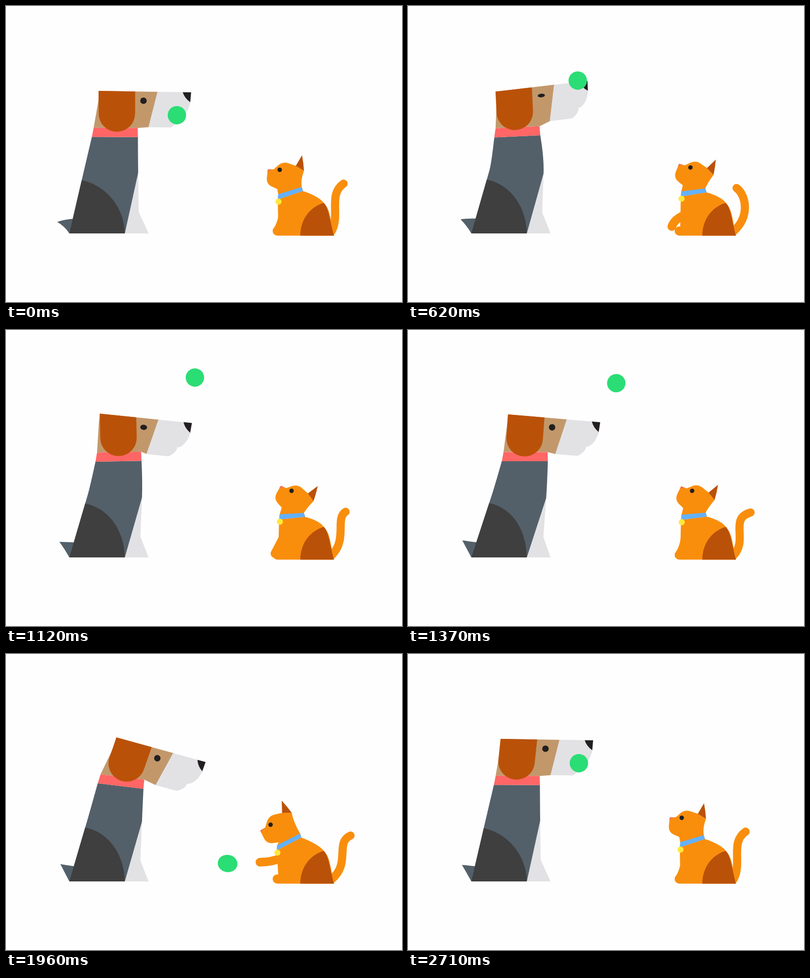
An HTML page with a canvas that plays this animation: 800x600 px, repeating every 2.75 s.

```html
<!DOCTYPE html>
<html lang="en">
<head>
<meta charset="utf-8">
<title>Dog and cat playing ball</title>
<style>
  html, body { margin: 0; width: 100%; height: 100%; overflow: hidden; background: #fefefe; }
  canvas { display: block; width: 100vw; height: 100vh; }
</style>
</head>
<body>
<canvas id="stage" width="800" height="600"></canvas>
<script>
const ctx = document.getElementById('stage').getContext('2d');
const LOOP = 2750, STEPS = 66, GRAVITY = 2.403;
const C = {
  bg: '#fefefe', slate: '#53606a', dark: '#3f3f3f', pale: '#e2e2e5', tan: '#c2986b',
  brown: '#ba5108', red: '#ff6666', ink: '#231f20', green: '#2bdd75',
  orange: '#f98e0d', blue: '#64b1fb', yellow: '#ffe83c', pink: '#f0705f'
};

// Smooth looping motion through key poses; each pose is [step, ...values].
function track(poses) {
  const n = poses.length;
  const pose = i => poses[(i + n) % n];
  const time = i => pose(i)[0] + Math.floor(i / n) * STEPS;
  const slope = (i, c) => (pose(i + 1)[c] - pose(i)[c]) / (time(i + 1) - time(i));
  const tangent = (i, c) => {
    const a = slope(i - 1, c), b = slope(i, c);
    return a * b <= 0 ? 0 : 2 * a * b / (a + b);
  };
  return k => {
    let i = n - 1;
    while (poses[i][0] > k) i--;
    const d = time(i + 1) - time(i), u = (k - time(i)) / d, v = 1 - u;
    return pose(i).slice(1).map((a, j) => {
      const c = j + 1;
      return v * v * (1 + 2 * u) * a + u * u * (3 - 2 * u) * pose(i + 1)[c]
        + d * u * v * (v * tangent(i, c) - u * tangent(i + 1, c));
    });
  };
}

// Body lean, neck x, head corner x and y, head tilt, ear swing.
const dogPose = track([
  [0, 0, 220, 187, 172, 0.9, 0],
  [9, 8, 224, 178, 179, -9, -2],
  [11, 8, 223, 176, 178, -14, -2],
  [21, 3, 218.5, 180, 168, 6.8, -4],
  [33, 11, 236, 202, 171, 4.9, 4],
  [47, 7, 231.5, 223, 169, 15.5, 19],
  [58, 0, 224, 220, 169, 16.5, 4],
  [65, 0, 220, 187, 172, 0.9, 6]
]);
// Eye x and y, head tilt, tail handles x, tail tip x and y.
const catPose = track([
  [0, 553, 332, 0, 676, 650, 682, 360],
  [9, 560, 329.5, 5, 692, 682, 655, 371],
  [21, 578, 326, 24, 693, 681, 677, 367],
  [33, 574, 326, 20, 688, 648, 692, 370],
  [47, 534.5, 346, -32, 697, 664, 696, 368],
  [58, 542.5, 338, -9, 676, 645, 678.5, 358],
  [65, 553, 332, 0, 676, 650, 682, 360]
]);

const rad = deg => deg * Math.PI / 180;
const mix = (a, b, u) => a.map((v, i) => v + (b[i] - v) * u);
const add = (p, x, y) => [p[0] + x, p[1] + y];
const peak = (k, mid, half) => Math.max(0, 1 - Math.abs(k - mid) / half);
const ease = (k, from, to) => {
  const u = Math.min(1, Math.max(0, (k - from) / (to - from)));
  return u * u * (3 - 2 * u);
};
const place = (ox, oy, deg) => (x, y) => {
  const c = Math.cos(rad(deg)), s = Math.sin(rad(deg));
  return [ox + x * c - y * s, oy + x * s + y * c];
};

function fill(color, d) {
  ctx.fillStyle = color;
  ctx.fill(new Path2D(d));
}
function line(color, width, d) {
  ctx.strokeStyle = color;
  ctx.lineWidth = width;
  ctx.lineCap = 'round';
  ctx.stroke(new Path2D(d));
}
function oval(color, [x, y], rx, ry = rx, turn = 0) {
  ctx.fillStyle = color;
  ctx.beginPath();
  ctx.ellipse(x, y, rx, ry, turn, 0, 2 * Math.PI);
  ctx.fill();
}
function local(x, y, deg, draw) {
  ctx.save();
  ctx.translate(x, y);
  ctx.rotate(rad(deg));
  draw();
  ctx.restore();
}

function drawDog(k) {
  const [lean, neckX, x, y, tilt, swing] = dogPose(k);
  const at = place(x, y, tilt);
  // The collar turns as the head moves ahead of the neck.
  const collar = place(neckX, 265.3 + 0.15 * tilt, 0.27 * (34 - neckX + x));
  const bl = collar(-46.5, 0), br = collar(46.5, 0);
  const tl = collar(-43, -18.5), tr = collar(46, -18.5);

  const foot = [128, 461], knee = [240, 461];
  const hip = [153 + lean, 353 - 0.2 * lean];
  const elbow = [267 + 1.1 * lean, 338 + 0.25 * lean];
  const shin = [268 + 0.5 * lean, 417 + 0.25 * lean];
  const wag = Math.cos(2 * Math.PI * 19 * k / STEPS - rad(30));
  const tip = [106.5 - 3.5 * wag, 432 + 6.5 * wag];

  fill(C.slate, `M${tip}Q118,${430 + 2.5 * wag} 142,431L${foot}Q118,${444 + 2 * wag} ${tip}Z`);
  fill(C.pale, `M${elbow}L${shin}L288,461H238Z`);
  fill(C.slate, `M${foot}L${mix(foot, hip, 1.157)}Q${mix(foot, hip, 1.3)} ${bl}L${br}
    Q${mix(shin, elbow, 1.4)} ${elbow}L${knee}Z`);
  fill(C.dark, `M${hip}C${add(hip, 51, 11)} 239,410 ${knee}L${foot}Z`);

  fill(C.tan, `M${at(0, 0)}L${at(120, 0)}L${at(103, 72)}L${tr}L${tl}L${at(0, 20)}Z`);
  local(x, y, tilt, () => {
    fill(C.pale, 'M119,0H187L186,20C182,38 174,51 161,53L163,54C160,64 153,68 147,72H102Z');
    fill(C.ink, 'M170,0H187L185.5,20Q174,12 170,0Z');
  });
  fill(C.red, `M${tl}L${tr}L${br}L${bl}Z`);

  const r = 36.8, ear = place(...at(37, 0), swing);
  fill(C.brown, `M${at(0, 0)}L${at(74, 0)}L${ear(r, 45.5)}A${r},${r} 0 0 1 ${ear(-r, 45.5)}Z`);
  const blink = peak(k, 18, 14);
  oval(C.ink, at(91, 18.6), 6.5 + blink, 6.5 - 3.6 * blink, rad(tilt));
}

function drawCat(k) {
  const [ex, ey, tilt, c1, c2, tx, ty] = catPose(k);
  const at = place(ex, ey, tilt);
  const look = ex - 553;
  const bl = [549 + 0.12 * look, 392 - 0.33 * look];
  const tr = [597.5 + 0.18 * look, 367 + 0.16 * look];
  const br = add(tr, 2.5, 8), tl = add(bl, 1, -10.5);
  // One small lift of the paw, then the swat.
  const lift = ease(k, 4, 9) - ease(k, 22, 30);
  const swat = ease(k, 38, 45) - ease(k, 47, 54);
  const leg = (x, y) => [x - 20 * lift - 20 * swat, y - 8 * lift - 18 * swat];
  const paw = [548 - 15 * lift - 35 * swat, 456 - 9 * lift - 34 * swat];

  line(C.orange, 16.5, `M657.5,457C${c1},425 ${c2},382 ${tx},${ty}`);
  line(C.orange, 17.5, `M560,${420 + 3 * lift - 8 * swat}Q${leg(558, 440)} ${paw}`);
  oval(C.orange, [548, 456], 9.3);
  fill(C.orange, `M${bl}L550,447L548,465.5H662.5C655,430 655,412 642,399Q632,386 ${br}Z`);
  fill(C.brown, 'M594.5,465.5C595,433 613,408 642,399C652,410 653,428 662.5,465.5Z');

  fill(C.orange, `M${at(-24, -1)}L${at(-12, -1)}L${at(-2, -10)}Q${at(6, -16)} ${at(15, -14)}
    L${at(33, -8)}L${at(49, 2)}Q${at(42, 20)} ${tr}L${br}L${bl}L${tl}L${at(-5, 39)}
    L${at(-16, 34)}Q${at(-27, 29)} ${at(-26, 16)}Z`);
  local(ex, ey, tilt, () => {
    fill(C.pink, 'M-24,-1H-17L-25,5Z');
    fill(C.brown, 'M32.5,-8L45,-29.5Q48,-14 49,2Z');
    oval(C.ink, [0, 0], 4.5);
  });
  fill(C.blue, `M${tl}L${tr}L${br}L${bl}Z`);
  oval(C.yellow, add(bl, 1.5, 4.5), 6.2);
}

function mouth(k) {
  const [, , x, y, tilt] = dogPose(k);
  return place(x, y, tilt)(159, 46.8);
}
function arc(k, k0, from, k1, to, g = GRAVITY) {
  const d = k1 - k0, u = (k - k0) / d;
  return add(mix(from, to, u), 0, -0.5 * g * d * d * u * (1 - u));
}
function ballAt(k) {
  const bounce = [345, 172.5], launch = [349, 153], hit = [499, 390], floor = [422, 442];
  if (k < 11 || k >= 54) return mouth(k);
  if (k < 21) return arc(k, 11, mouth(11), 21, bounce);
  if (k < 22) return arc(k, 21, bounce, 22, launch, 0);
  if (k < 45) return arc(k, 22, launch, 45, hit);
  if (k < 48) return arc(k, 45, hit, 48, floor, 0);
  return arc(k, 48, floor, 54, mouth(54));
}
function drawBall(k) {
  const nose = peak(k, 21, 1);
  const squash = nose + 0.35 * peak(k, 47, 2);
  oval(C.green, ballAt(k), 18.6 + 3.8 * squash, 18.6 - 3 * squash, nose ? 0.5 : 0.15);
}

function frame() {
  // Motion runs on a 24 fps grid.
  const k = Math.floor((performance.now() % LOOP + 6) * STEPS / LOOP) % STEPS;
  ctx.fillStyle = C.bg;
  ctx.fillRect(0, 0, 800, 600);
  drawDog(k);
  drawCat(k);
  drawBall(k);
  requestAnimationFrame(frame);
}
frame();
</script>
</body>
</html>
```
